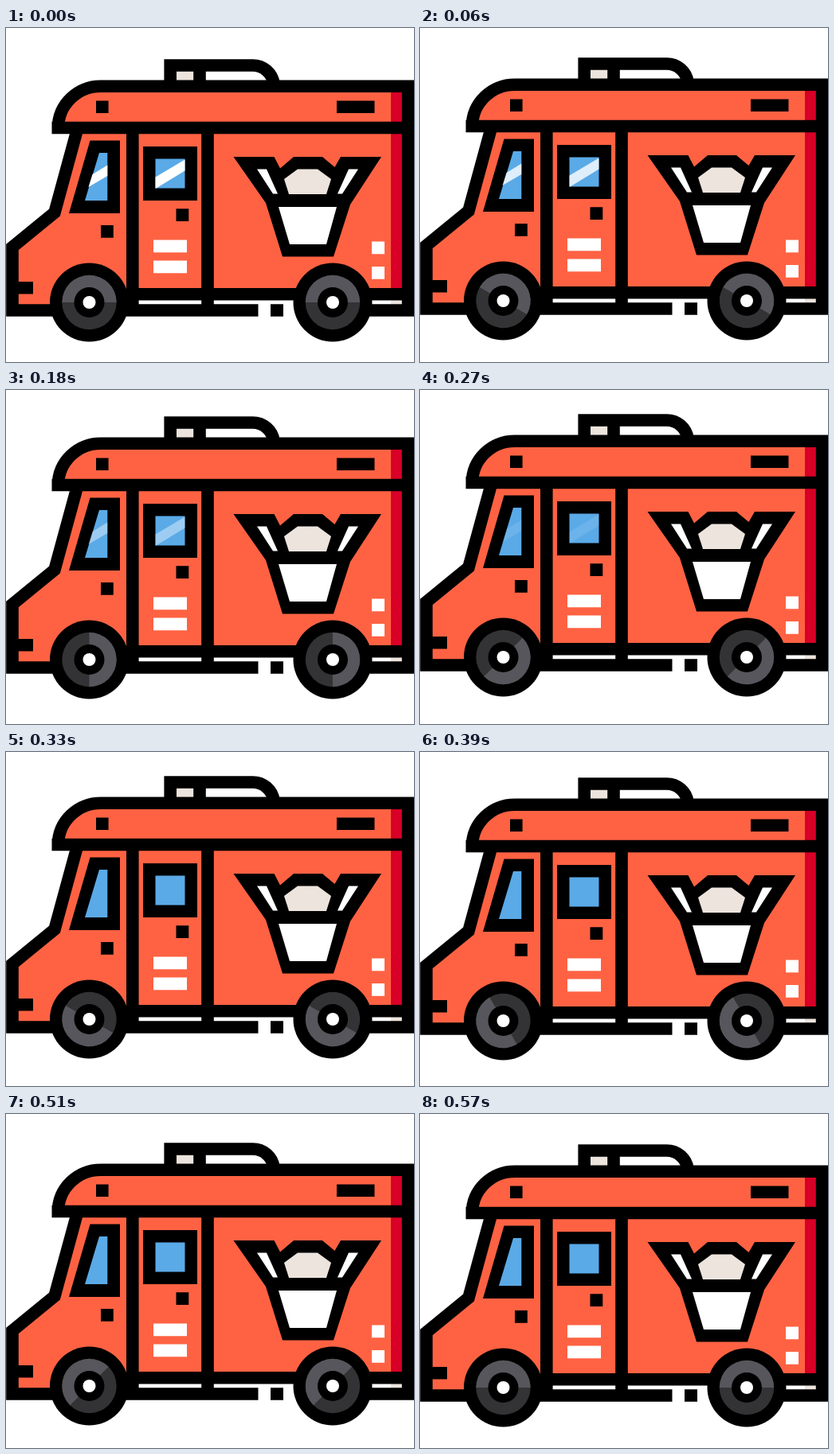
An HTML page for the animation above (0.6 s loop, 512 by 420 pixels).

```html
<!DOCTYPE html>
<html lang="en">
<head>
<meta charset="utf-8">
<title>Food truck</title>
<style>
  html, body { margin: 0; width: 100%; height: 100%; overflow: hidden; background: #fff; }
  svg { display: block; width: 512px; height: 420px; }
  .red { fill: #ff6243; }
  .beige { fill: #ece4dd; }
  .blue { fill: #5aaae7; }
  .white { fill: #fff; }
  .line { fill: none; stroke: #000; stroke-width: 15.6; }
</style>
</head>
<body>
<svg viewBox="0 0 512 420">
  <defs>
    <g id="wheel">
      <circle r="49.5"/>
      <g class="rim">
        <circle r="34.2" fill="#333335"/>
        <path d="M-34.2 0A34.2 34.2 0 0 1 34.2 0Z" fill="#57565c"/>
      </g>
      <circle r="19"/>
      <circle r="8" class="white"/>
    </g>
  </defs>
  <g id="truck">
    <!-- roof vent -->
    <path class="beige" d="M214 54h22v14h-22z"/>
    <path class="line" d="M206.2 70V47H309.5A26.5 26.5 0 0 1 336 70M243 47V70"/>

    <!-- body -->
    <path class="red" d="M65.5 125.5A53.5 52.3 0 0 1 119 73.2H484V334.5H158V355H8V275.5L61 232L90 125.5Z"/>
    <path fill="#d80027" d="M483 73h15v262h-15z"/>
    <path class="beige" d="M483 340h15v10h-15z"/>
    <path class="line" d="M57.5 125.5H65.5A53.5 52.3 0 0 1 119 73.2H504.6V355H410M57.5 125.5H505"/>
    <path class="line" d="M90 125.5L61 232L8 275.5V355H316.5M332 355H348"/>
    <path class="line" d="M158.8 125V355M253 125V355M158 334.8H505"/>
    <path d="M113 91.5h15.600v15.600h-15.600zM415 91.500h47.500v15.600h-47.500zM119 248h15.800v15.800h-15.800zM213.500 227.300h15.800v15.800h-15.800zM14 319h20v15.500h-20z"/>
    <path class="white" d="M185 266.500h42v15.800h-42zM185 292.500h42v15.800h-42zM459 268.500h16v15.800h-16zM459 300h16v15.800h-16z"/>

    <!-- windows -->
    <path d="M105.500 141.500H143V233H79ZM172 149h68v68h-68z"/>
    <path class="blue" d="M117 157h10.300v60h-28.300zM187.500 164.500h37v37h-37z"/>
    <path id="glint" class="white" d="M108.500 184L127.300 172.500V186L103.500 200ZM187.500 187.500L224.500 165.500V179.500L188.500 201.500H187.500Z"/>

    <!-- takeaway box -->
    <path d="M285.500 162H336.500L344 176.500L361 162H397L412.500 175L420 162H471L432 222L411 287.500H347L326 220Z"/>
    <path class="beige" d="M349 190L366 177.500H391L408 190L402 209H355Z"/>
    <path class="white" d="M342 225H415L402 272H356ZM315 177.500H327L341 208.500H335ZM430 177.500H442L422 208.500H416Z"/>

    <use href="#wheel" x="104.500" y="345"/>
    <use href="#wheel" x="410" y="345"/>
  </g>
</svg>
<script>
  const LOOP = 600, STEP = 30;
  const truck = document.getElementById('truck');
  const rim = document.querySelector('.rim');
  const glint = document.getElementById('glint');
  // wheel angle by time: [ms, degrees]
  const turn = [[0, 0], [270, 135], [330, 210], [450, 270], [570, 360]];

  function angleAt(t) {
    const i = Math.max(1, turn.findIndex(([ms]) => ms >= t));
    const [t0, a0] = turn[i - 1], [t1, a1] = turn[i];
    return a0 + (a1 - a0) * (t - t0) / (t1 - t0);
  }

  function draw(now) {
    const t = Math.floor(now % LOOP / STEP) * STEP;
    const half = LOOP / 2;
    const lift = 10 * (1 - Math.abs(t - half) / half);
    truck.setAttribute('transform', `translate(0 ${-lift})`);
    rim.setAttribute('transform', `rotate(${angleAt(t)})`);
    glint.setAttribute('opacity', Math.max(0, 1 - t / half));
  }

  function tick() {
    draw(performance.now());
    requestAnimationFrame(tick);
  }
  tick();
</script>
</body>
</html>
```
